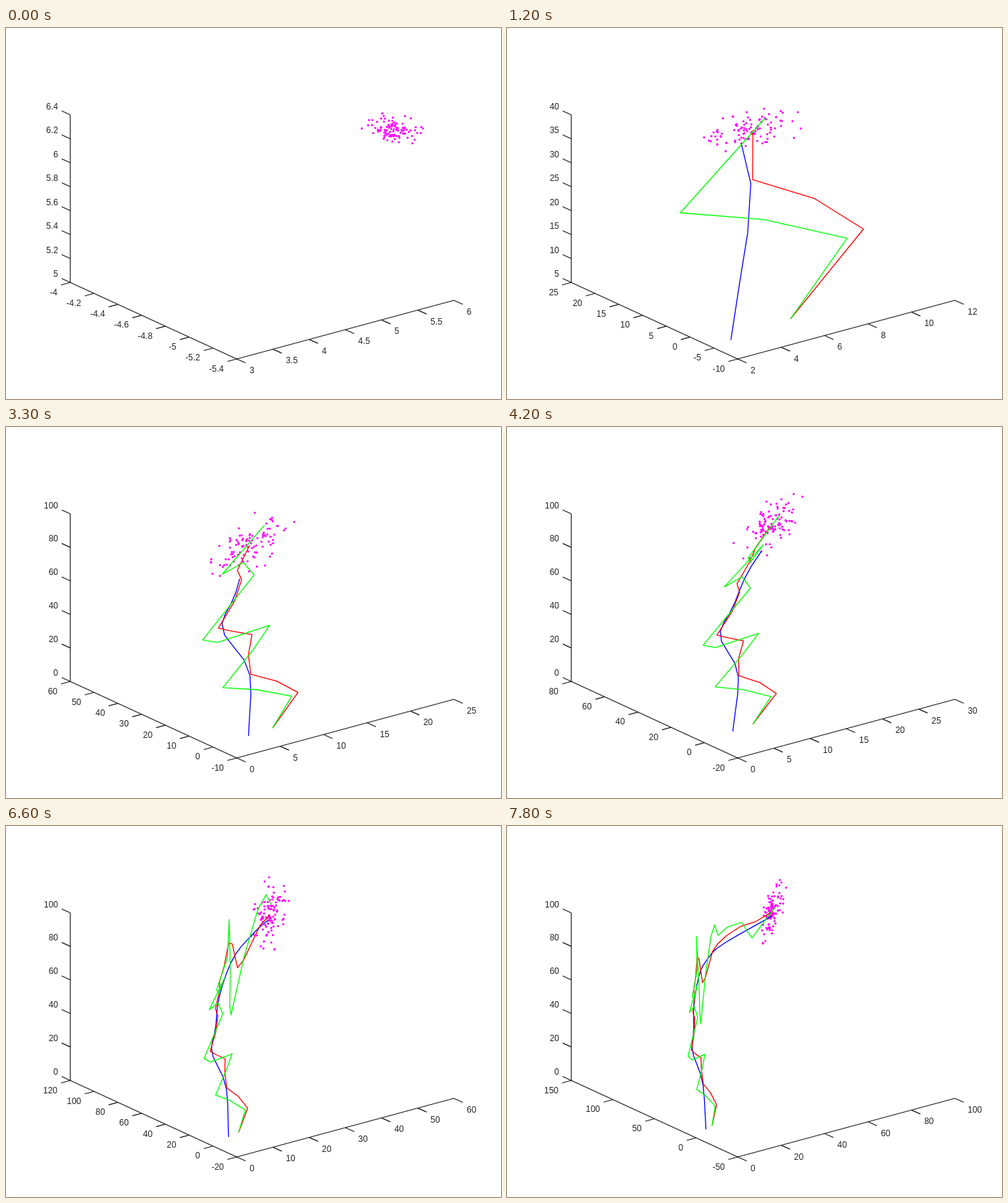
These frames come from a looping animation (693x519 px, 8 s). An HTML page with a canvas:

```html
<!DOCTYPE html>
<html lang="en">
<head>
<meta charset="utf-8">
<title>Trajectory tracking in 3D</title>
<style>
html, body { margin: 0; width: 100%; height: 100%; overflow: hidden; background: #fff; }
canvas { display: block; width: 693px; height: 519px; }
</style>
</head>
<body>
<canvas id="plot"></canvas>
<script>
const W = 693, H = 519, LOOP = 8000, STEP = 300, STEPS = 27;
const INK = "#1a1a1a";
const canvas = document.getElementById("plot");
const ctx = canvas.getContext("2d");
const ratio = window.devicePixelRatio || 1;
canvas.width = W * ratio;
canvas.height = H * ratio;

const lerp = (a, b, f) => a + (b - a) * f;
const times = (n, fn) => Array.from({ length: n }, (_, i) => fn(i));

// The true course is a spline through evenly timed points
const course = [
  [3, -4, 5], [7.1, 10.7, 28.2], [7.9, 24.9, 43], [11.6, 33.1, 52.8], [17.6, 48.4, 62.6],
  [27.6, 68, 72.4], [39, 87.6, 73.3], [53.8, 108.7, 71.8], [82, 122.8, 75.6]
];

function knot(i, axis) {
  const last = course.length - 1;
  if (i < 0) return 2 * course[0][axis] - course[1][axis];
  if (i > last) return 2 * course[last][axis] - course[last - 1][axis];
  return course[i][axis];
}

function spline(k, axis) {
  const s = k / (STEPS - 1) * (course.length - 1);
  const i = Math.min(Math.floor(s), course.length - 2), t = s - i;
  const [a, b, c, d] = [-1, 0, 1, 2].map(j => knot(i + j, axis));
  return b + t / 2 * (c - a + t * (2 * a - 5 * b + 4 * c - d + t * (3 * (b - c) + d - a)));
}

const truth = times(STEPS, k => [0, 1, 2].map(axis => spline(k, axis)));

// Sensor: range error in percent, plus a sideways wobble that dies out
const rangeError = [28, 20, 8, -2, 9, 9, -4, -7, 22, 27, 16, 28, 10, 6, 17, 32, -5, -27, -34,
  -8, 11, 15, 7, 8, 6, -6, 4];

const errors = truth.map((p, k) => {
  const u = k - .9, w = Math.cos(Math.PI * u * (.452 + .012 * u));
  const fade = Math.exp(-((k / 13) ** 4));
  const wobble = [.5 + 4.1 * w, 2 * w, 0];
  return p.map((v, axis) => v * rangeError[k] / 100 + wobble[axis] * fade);
});

// Filter: follows the sensor with a gain that falls over time
const residuals = [errors[0]];
for (let k = 1; k < STEPS; k++) {
  const gain = .5 - .012 * k + .85 / k ** 4;
  residuals.push(residuals[k - 1].map((e, axis) => lerp(e, errors[k][axis], gain)));
}

const shift = offsets => truth.map((p, k) => p.map((v, axis) => v + offsets[k][axis]));
const measured = shift(errors), estimate = shift(residuals);

// Data bounds and cloud: [step, max x, max y, max z, spread x, spread y, correlation]
const lowest = [3.01, -5.35, 5.01];
const stages = [
  [0, 5.7, -4.01, 6.39, 18, 9.5, .15], [1, 11, 1, 17, 21, 10, 0],
  [4, 11.9, 22, 38, 31, 12, -.35], [7, 13.5, 29.6, 56, 36, 17, -.7],
  [11, 24, 56, 88, 25, 21, -.6], [18, 34.9, 92, 92, 15, 15, -.5],
  [22, 55, 113, 95, 11, 22, -.25], [26, 90, 147, 98, 7.5, 18, -.65]
];

function stageAt(k) {
  const i = Math.max(1, stages.findIndex(s => s[0] >= k));
  const a = stages[i - 1], b = stages[i], f = (k - a[0]) / (b[0] - a[0]);
  return a.map((v, j) => lerp(v, b[j], f));
}

function scale(min, max) {
  const raw = (max - min) / 5, base = 10 ** Math.floor(Math.log10(raw)), m = raw / base;
  const step = base * (m < 1.41 ? 1 : m < 3 ? 2 : m < 6.9 ? 5 : 10);
  const lo = Math.floor(min / step) * step, hi = Math.ceil(max / step) * step;
  return { lo, step, count: Math.round((hi - lo) / step), at: v => (v - lo) / (hi - lo) };
}

const place = (u, v, w) => [323 + 304 * u - 233 * v, 463 - 82 * u - 107 * v - 234.5 * w];

function polyline(points, color, width) {
  ctx.beginPath();
  points.forEach(p => ctx.lineTo(...p));
  ctx.strokeStyle = color;
  ctx.lineWidth = width;
  ctx.stroke();
}

function drawAxis({ lo, step, count }, spot, tick, label, align) {
  polyline([spot(0), spot(1)], INK, 1.2);
  ctx.textAlign = align;
  for (let i = 0; i <= count; i++) {
    const [x, y] = spot(i / count);
    polyline([[x, y], [x + tick[0], y + tick[1]]], INK, 1.2);
    ctx.fillText(String(Number((lo + i * step).toFixed(1))), x + label[0], y + label[1]);
  }
}

function seeded(seed) {
  return () => {
    seed = (seed + 0x6D2B79F5) | 0;
    let r = Math.imul(seed ^ (seed >>> 15), 1 | seed);
    r = (r + Math.imul(r ^ (r >>> 7), 61 | r)) ^ r;
    return ((r ^ (r >>> 14)) >>> 0) / 4294967296;
  };
}

function drawCloud(k, [cx, cy], [sx, sy, c]) {
  const rnd = seeded(97 + k * 131);
  ctx.fillStyle = "#f0f";
  for (let i = 0; i < 100; i++) {
    const r = Math.min(2.5, Math.sqrt(-2 * Math.log(1 - rnd()))), a = rnd() * 2 * Math.PI;
    const g = r * Math.cos(a), h = c * g + Math.sqrt(1 - c * c) * r * Math.sin(a);
    ctx.beginPath();
    ctx.arc(cx + sx * g, cy + sy * h, 1.5, 0, 2 * Math.PI);
    ctx.fill();
  }
}

function draw(k) {
  const stage = stageAt(k);
  const axes = lowest.map((min, i) => scale(min, stage[i + 1]));
  const project = p => place(...axes.map((axis, i) => axis.at(p[i])));
  ctx.setTransform(ratio, 0, 0, ratio, 0, 0);
  ctx.fillStyle = "#fff";
  ctx.fillRect(0, 0, W, H);
  ctx.lineJoin = "round";
  ctx.font = '12px "Liberation Sans", Arial, sans-serif';
  ctx.fillStyle = "#262626";
  drawAxis(axes[0], u => place(u, 0, 0), [12.5, 5.5], [18, 20], "left");
  drawAxis(axes[1], v => place(0, v, 0), [-13, 3.5], [-18, 17.5], "right");
  drawAxis(axes[2], w => place(0, 1, w), [-12, -5.5], [-17, -8], "right");
  // The first cloud is spread before any tracking
  drawCloud(k, k ? project(estimate[k]) : [540, 143], stage.slice(4));
  if (!k) return;
  [[truth, "#00f"], [estimate, "#f00"], [measured, "#0f0"]].forEach(([path, color]) =>
    polyline(path.slice(0, k + 1).map(project), color, 1.3));
}

let shown = -1;
const start = performance.now();
function tick(now) {
  const k = Math.floor((Math.max(0, now - start) % LOOP) / STEP);
  if (k !== shown) draw(shown = k);
  requestAnimationFrame(tick);
}
tick(start);
</script>
</body>
</html>
```
